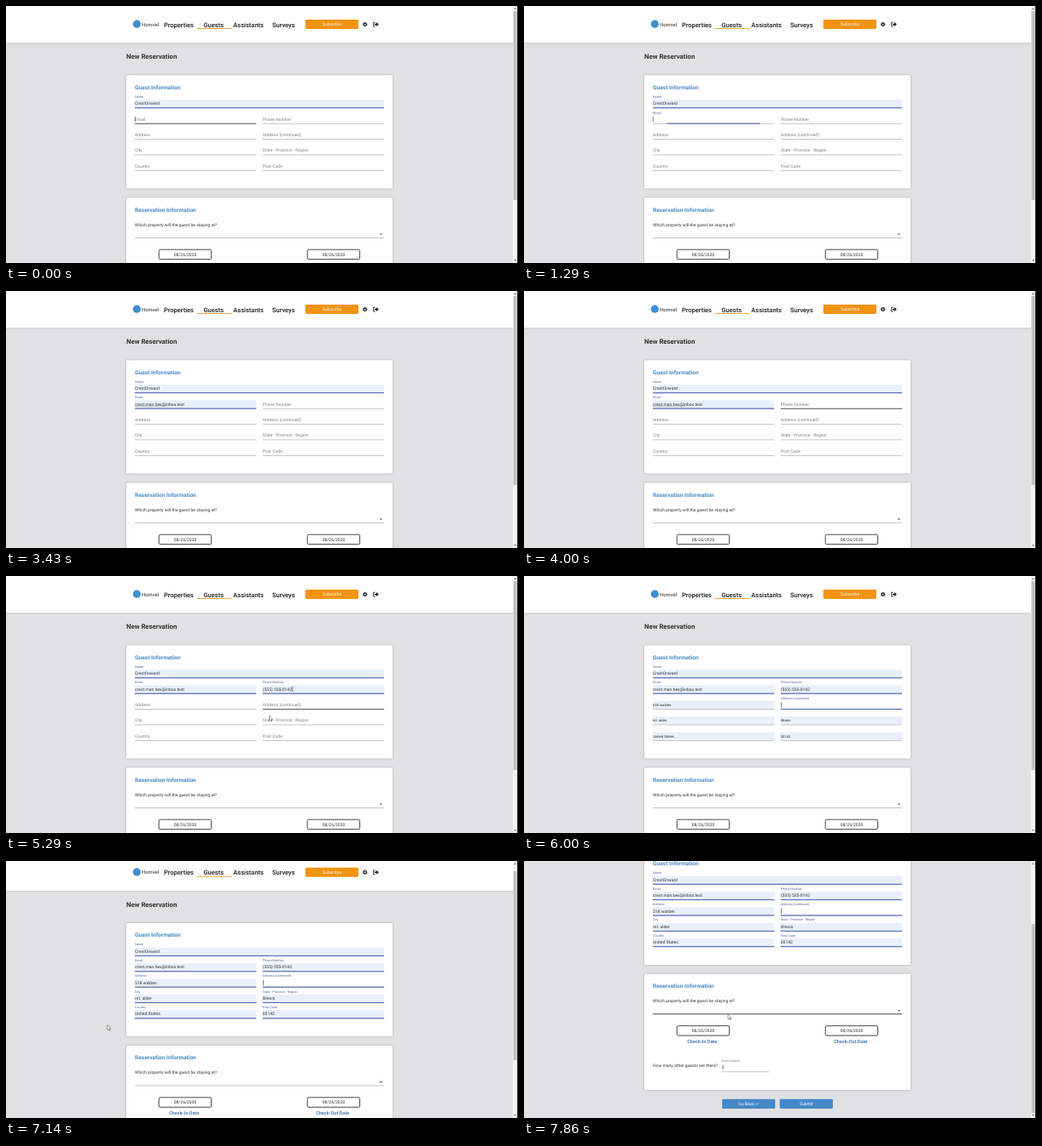
These frames come from a looping animation (600x302 px, 8 s). An HTML page:

```html
<!DOCTYPE html>
<html lang="en">
<head>
<meta charset="utf-8">
<title>New Reservation</title>
<style>
html, body { margin: 0; width: 100%; height: 100%; overflow: hidden; background: #e1e0e2; }
svg { display: block; width: 600px; height: 302px; }
text { font: 5px Roboto, sans-serif; fill: #333; text-rendering: geometricPrecision; white-space: pre; }
.card { fill: #fefefe; filter: drop-shadow(0 .6px .8px rgba(0, 0, 0, .28)); }
.nav { font-size: 7.5px; font-weight: 500; fill: #1c1c1c; }
.title { font-size: 7.8px; font-weight: 700; }
.head { font-size: 6.6px; font-weight: 700; fill: #4a8cc9; }
.date { font-size: 5.5px; font-weight: 700; fill: #3f7fbf; text-anchor: middle; }
.mid { text-anchor: middle; }
.white { fill: #fff; }
.label { fill: #808080; }
.small { font-size: 3.75px; fill: #808080; }
.preview { font: 4.17px "Liberation Sans", Arial, sans-serif; fill: #222; }
.auto { fill: #e8f0fb; }
.line { fill: #a0a0a0; }
.hover { fill: #444; }
.active { fill: #4a5fb4; }
.caret { fill: #333; }
.scroll { animation: scroll 8s infinite; }
.thumb { animation: thumb 8s infinite; }
@keyframes scroll {
  0%, 86.4% { transform: none; animation-timing-function: linear; }
  87.5% { transform: translateY(-1px); animation-timing-function: ease-in-out; }
  96.4%, 100% { transform: translateY(-92.5px); }
}
@keyframes thumb {
  0%, 86.4% { transform: none; animation-timing-function: linear; }
  87.5% { transform: translateY(.7px); animation-timing-function: ease-in-out; }
  96.4%, 100% { transform: translateY(68px); }
}
</style>
</head>
<body>
<svg viewBox="0 0 600 302" xmlns="http://www.w3.org/2000/svg">
  <rect width="600" height="302" fill="#e1e0e2"/>
  <g class="scroll">
    <rect class="card" x="-5" y="-5" width="610" height="48.3"/>
    <circle cx="153.3" cy="21.2" r="4.6" fill="#3f8fd2"/>
    <text x="159" y="23.6" style="font-size:5.9px;font-weight:500;fill:#555">Homvel</text>
    <text class="nav" x="185" y="24.7">Properties</text>
    <text class="nav" x="231.5" y="24.7">Guests</text>
    <text class="nav" x="266.3" y="24.7">Assistants</text>
    <text class="nav" x="312" y="24.7">Surveys</text>
    <rect x="223.5" y="26" width="40.5" height="1" fill="#eda437"/>
    <rect x="350.7" y="16" width="62.3" height="11" rx="1.4" fill="#f39314"/>
    <text class="mid white" x="382" y="23.3">Subscribe</text>
    <circle cx="420.7" cy="21.6" r="1.6" fill="none" stroke="#222" stroke-width="1.3"/>
    <circle cx="420.7" cy="21.6" r="2.4" fill="none" stroke="#222" stroke-width=".7" stroke-dasharray=".94 .94"/>
    <path d="M432.6 19.2h-1.9v4.9h1.9" fill="none" stroke="#222" stroke-width=".9"/>
    <path d="M432 20.8h2v-1.7l2.9 2.5-2.9 2.5v-1.7h-2z" fill="#222"/>

    <text class="title" x="141" y="62.4">New Reservation</text>
    <rect class="card" x="141" y="81.2" width="312" height="133.2" rx="1.2"/>
    <text class="head" x="151" y="97.6">Guest Information</text>
    <g id="fields"></g>

    <rect class="card" x="141" y="225.2" width="312" height="136.2" rx="1.2"/>
    <text class="head" x="151" y="241.8">Reservation Information</text>
    <text x="151" y="258.7">Which property will the guest be staying at?</text>
    <rect class="line" x="151" y="272" width="292" height=".6"/>
    <path d="M437.4 267.4h3.8l-1.9 1.9z" fill="#666"/>
    <g fill="#fff" stroke="#333" stroke-width=".9">
      <rect x="179.2" y="286.2" width="61.4" height="11.4" rx="1.4"/>
      <rect x="353.2" y="286.2" width="61.4" height="11.4" rx="1.4"/>
    </g>
    <text class="mid" x="210" y="293.7">08/26/2020</text>
    <text class="mid" x="384" y="293.7">08/26/2020</text>
    <text class="date" x="208.7" y="306.4">Check-In Date</text>
    <text class="date" x="382.7" y="306.4">Check-Out Date</text>
    <text x="151" y="334.1">How many other guests are there?</text>
    <text class="small" x="231.8" y="328.2">Extra Guests</text>
    <text x="231.8" y="336.9">0</text>
    <rect class="line" x="231.8" y="340" width="56" height=".6"/>
    <rect x="232.2" y="372.2" width="62.2" height="11.2" rx="1.3" fill="#4489c8"/>
    <rect x="299.7" y="372.2" width="62.2" height="11.2" rx="1.3" fill="#4489c8"/>
    <text class="mid white" x="263.3" y="379.6">Go Back ↩</text>
    <text class="mid white" x="330.8" y="379.6">Submit</text>
    <g id="extras"></g>
  </g>
  <rect x="594" width="6" height="302" fill="#f3f3f3"/>
  <path d="M595.2 4l1.5-1.8 1.5 1.8zM595.2 298l1.5 1.8 1.5-1.8z" fill="#666"/>
  <rect class="thumb" x="594.6" y="6" width="4" height="222" fill="#c2c2c2"/>
  <rect x="599" width="1" height="302" fill="#2b2b2b"/>
  <path id="cursor" d="M0 0v6l1.4-1.2 1 2.1.9-.4-1-2h1.9z" fill="#fff" stroke="#444" stroke-width=".5"/>
</svg>
<script>
const LOOP = 8000, FILL = 6220;
const NS = 'http://www.w3.org/2000/svg';
const $ = id => document.getElementById(id);
const fields = $('fields'), extras = $('extras'), cursor = $('cursor');
const timed = [], floats = [], grows = [];

function add(parent, tag, attrs, words = '') {
  const el = document.createElementNS(NS, tag);
  for (const k in attrs) el.setAttribute(k, attrs[k]);
  el.textContent = words;
  return parent.appendChild(el);
}
const during = (el, from, to = LOOP) => (timed.push({ el, from, to }), el);
const text = (cls, x, y, words) => add(fields, 'text', { class: cls, x, y }, words);
const box = (cls, x, y, width, height, parent = fields) =>
  add(parent, 'rect', { class: cls, x, y, width, height });

// previews: [from, to, words]; hide: the resting label is gone between these times
function field({ row, col = 0, w = 142.3, label, focus, auto, value, fill, previews = [], hide }) {
  const x = 151 + col * 149.8, y = 116.3 + row * 18.37;
  if (auto !== undefined) during(box('auto', x, y - 6.2, w, 9.2), auto);
  box('line', x, y + 3.2, w, .6);
  grows.push({ el: box('active', x, y + 2.9, w, 1), x, w, at: focus });
  const el = add(fields, 'text', { class: 'label' }, label);
  floats.push({ el, x, y, at: focus });
  if (hide) {
    const rest = timed.push({ el, from: 0, to: hide }) - 1;
    timed[rest].again = focus;
  }
  for (const [from, to, words] of previews) during(text('preview', x, y - .1, words), from, to);
  if (value) during(text('', x, y, value), fill);
}

const mail = 'crest.man.bex@inbox.test', phone = '(555) 555-0142';
field({ row: 0, w: 292, label: 'Name', focus: -1000, auto: 0, value: 'CrestOnward', fill: 0 });
field({ row: 1, label: 'Email', focus: 1140, auto: 1700, value: mail, fill: 3430,
  previews: [[1700, 2570, 'pb.hartwick@inbox.test'], [2570, 3430, mail]] });
field({ row: 1, col: 1, label: 'Phone Number', focus: 4290, auto: 4710, value: phone, fill: 5000,
  previews: [[4710, 5000, phone]] });
field({ row: 2, col: 1, label: 'Address (continued)', focus: 5500 });
for (const [row, col, label, value, draft = value] of [
  [2, 0, 'Address', '518 walden'],
  [3, 0, 'City', 'mt. alder'],
  [3, 1, 'State · Province · Region', 'Illinois', 'illinois'],
  [4, 0, 'Country', 'United States'],
  [4, 1, 'Post Code', '00142']
]) field({ row, col, label, value, focus: FILL, fill: FILL, auto: 5860, hide: 5860,
  previews: [[5860, FILL, draft]] });

// hovered underlines
const hover = (x, y, w, from, to) => during(box('hover', x, y, w, .8, extras), from, to);
hover(151, 137.8, 142.3, 0, 1140);
hover(300.8, 137.8, 142.3, 3860, 4290);
hover(300.8, 156.2, 142.3, 5140, 5500);
hover(151, 272, 292, 7640);

// text carets and the spelling mark
const caret = (x, y, from, to) => during(box('caret', x, y, .6, 6.4, extras), from, to);
caret(150.9, 129.8, 0, 3430);
caret(301, 129.8, 4290, 5000);
caret(335.6, 129.8, 5000, 5500);
caret(301, 148.2, 5500);
during(box('line', 151, 135.6, 39, .5, extras), 3430, 4290);

const trips = [
  [[5140, 320, 148], [5290, 308.5, 164], [5430, 309, 157], [5500, 312, 152]],
  [[6860, 84, 196], [7000, 84, 196], [7600, 232, 182], [7860, 239, 180], [LOOP, 239, 180]]
];
function moveCursor(t) {
  const trip = trips.find(p => t >= p[0][0] && t < p[p.length - 1][0]);
  cursor.style.visibility = trip ? 'visible' : 'hidden';
  if (!trip) return;
  const i = trip.findIndex(p => p[0] > t), [t0, x0, y0] = trip[i - 1], [t1, x1, y1] = trip[i];
  const k = (t - t0) / (t1 - t0);
  cursor.setAttribute('transform', `translate(${x0 + (x1 - x0) * k} ${y0 + (y1 - y0) * k})`);
}

const ease = (t, at, span) => {
  const k = Math.min(1, Math.max(0, (t - at) / span));
  return k * k * (3 - 2 * k);
};
const start = performance.now();
function draw(now) {
  const t = Math.max(0, now - start) % LOOP;
  for (const { el, from, to, again = LOOP } of timed)
    el.style.visibility = (t >= from && t < to) || t >= again ? 'visible' : 'hidden';
  for (const { el, x, y, at } of floats) {
    const k = ease(t, at, 200);
    el.setAttribute('transform', `translate(${x} ${y - 8.5 * k}) scale(${1 - .25 * k})`);
    el.style.fill = t >= at ? '#5763a3' : '';
  }
  for (const { el, x, w, at } of grows) {
    const k = ease(t, at, 220);
    el.setAttribute('x', x + w * (1 - k) / 2);
    el.setAttribute('width', w * k);
  }
  moveCursor(t);
  requestAnimationFrame(draw);
}
draw(start);
</script>
</body>
</html>
```
